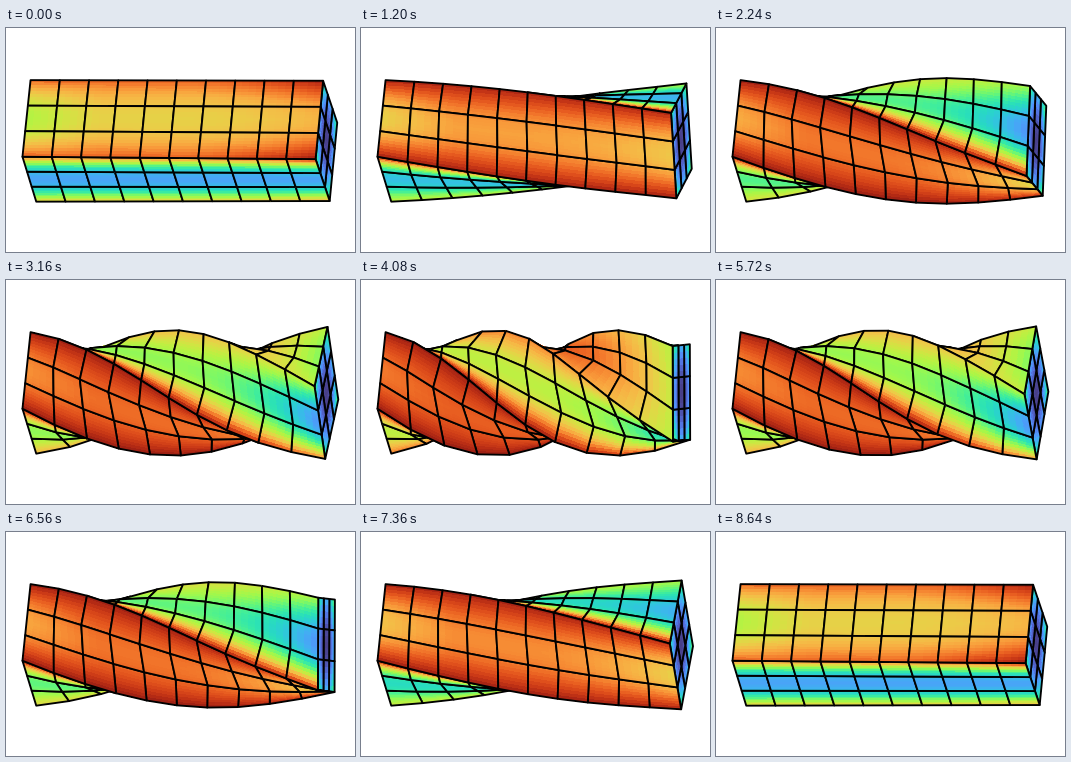
Write a matplotlib script that moves like this. It is 349 by 224 pixels and loops after 8.68 s.

```python
import numpy as np
import matplotlib.pyplot as plt
from matplotlib.animation import FuncAnimation
from matplotlib.collections import PolyCollection

W, H, DPI = 349, 224, 100
STEPS, HOLD, INTERVAL = 99, 10, 40
FRAMES = HOLD + STEPS + HOLD - 1 + STEPS

CELLS, ROWS = 10, 3          # cells along the beam and across a face
SUB_S, SUB_Z = 9, 4          # colour patches per cell
LEFT, MID_Y, LENGTH = 27.4, 112.9, 293.0
RADIUS, TILT = 62.8, 0.18
START, STEP = np.radians(14.6), np.radians(2.25)

# Colour levels over the load steps
KEYS = [0, 21, 32, 47, 73, 93]
LEVELS = dict(
    high_edge=[.80, .95, .96, .97, .97, .97],
    low_edge=[.62, .54, .55, .58, .67, .75],
    front=[.62, .71, .74, .77, .79, .81],
    side=[.21, .26, .32, .40, .48, .54],
    back=[.55, .65, .68, .70, .75, .83],
    left_drop=[.10, .09, .09, .08, .05, .04],
    front_drop=[-.06, .07, .12, .17, .20, .22],
    side_drop=[0, .03, .09, .22, .30, .28],
    high_drop=[-.17, 0, .02, .06, .28, .30],
    low_drop=[-.04, 0, .04, .08, .12, .22],
)
CMAP = plt.get_cmap("turbo")
HAZE = np.array([.75, .75, .75, 1])


def shade(values):
    """Colour map, slightly muted."""
    return .9 * CMAP(np.clip(values, 0, 1)) + .1 * HAZE


def refine(cells, sub):
    """Matrix of linear interpolation from cell nodes to finer nodes."""
    fine = np.linspace(0, cells, cells * sub + 1)
    return np.clip(1 - np.abs(fine[:, None] - np.arange(cells + 1)), 0, 1)


def project(q, z):
    """Section point (complex: up, towards viewer) and axial place to x, y, depth."""
    axial = z * LENGTH
    return np.stack([LEFT + axial - TILT * q.imag,
                     MID_Y - q.real,
                     q.imag + TILT * axial], axis=-1)


def quads(grid):
    return np.stack([grid[:-1, :-1], grid[1:, :-1],
                     grid[1:, 1:], grid[:-1, 1:]], axis=2)


def patch(nodes, values, sub):
    """Cells of one surface: colour quads, outlines and colours."""
    m, n = nodes.shape[0] - 1, nodes.shape[1] - 1
    a, b = sub
    fine = np.einsum("ij,jkc,lk->ilc", refine(m, a), nodes, refine(n, b))
    small = quads(fine).reshape(m, a, n, b, 4, 3)
    small = small.transpose(0, 2, 1, 3, 4, 5).reshape(m * n, a * b, 4, 3)
    outline = quads(nodes).reshape(m * n, 1, 4, 3)
    s = (np.arange(m * a) + .5) / (m * a)
    t = (np.arange(n * b) + .5) / (n * b)
    rgba = shade(values(s[:, None], t[None, :]))
    rgba = rgba.reshape(m, a, n, b, 4).transpose(0, 2, 1, 3, 4)
    return small, outline, rgba.reshape(m * n, a * b, 4)


def side_values(face, lv):
    mid = [lv["front"], lv["side"], lv["back"], lv["side"]][face]
    drop = lv["front_drop"] if face == 0 else lv["side_drop"]
    high = [True, True, False, False]

    def values(s, z):
        right = np.clip((z - .5) / .5, 0, 1) ** 2
        left = np.clip(1 - z / .25, 0, 1) * (face == 0)

        def edge(i):
            name = "high" if high[i % 4] else "low"
            return lv[name + "_edge"] - lv[name + "_drop"] * right

        centre = mid - drop * right - lv["left_drop"] * left
        rim = edge(face) * (1 - s) + edge(face + 1) * s
        return centre + (rim - centre) * (2 * s - 1) ** 2

    return values


def end_values(u, v):
    return .04 + .2 * ((2 * u - 1) ** 2 + (2 * v - 1) ** 2)


def beam(step):
    lv = {name: np.interp(step, KEYS, row) for name, row in LEVELS.items()}
    z = np.linspace(0, 1, CELLS + 1)
    total = STEP * (step + 1)
    # each increment moves the end along its tangent, so the end face grows
    growth = (1 + STEP ** 2) ** ((step + 1) / 2) - 1
    weight = np.clip((z - .87) / .13, 0, 1)
    radius = RADIUS * (1 + growth * weight)
    corners = [radius * np.exp(1j * (START + total * z + i * np.pi / 2))
               for i in range(5)]

    # axial warping of the sections, held back near both ends
    s = np.linspace(0, 1, ROWS + 1)[:, None]
    y = 2 * s - 1
    free = np.clip(np.minimum(z, 1 - z) * CELLS / 2.5, 0, 1)
    warp = 2.4 * total * y * (1 - y ** 2) * free
    dish = total * np.sin(2 * np.pi * z) * (2.2 * y ** 2 - 1.2)
    place = z + (warp + dish) / LENGTH

    parts = []
    for face in range(4):
        q = corners[face] * (1 - s) + corners[face + 1] * s
        parts.append(patch(project(q, place), side_values(face, lv),
                           (SUB_S, SUB_Z)))
    a, b, _, d = [c[-1] for c in corners[:4]]
    q = a + (b - a) * s + (d - a) * s.T
    parts.append(patch(project(q, np.ones(q.shape)), end_values, (5, 5)))
    return parts


def visible(polys):
    ds = polys[..., 1, :] - polys[..., 0, :] + polys[..., 2, :] - polys[..., 3, :]
    dt = polys[..., 3, :] - polys[..., 0, :] + polys[..., 2, :] - polys[..., 1, :]
    return ds[..., 0] * dt[..., 1] - ds[..., 1] * dt[..., 0] < 0


def scene(step):
    """Visible polygons from back to front, their colours and outline flags."""
    cells = []
    for small, outline, rgba in beam(step):
        depth = outline[:, 0, :, 2].mean(axis=1)
        seen = visible(small)
        for i in np.flatnonzero(seen.any(axis=1)):
            cells.append((depth[i], small[i][seen[i]], rgba[i][seen[i]],
                          outline[i]))
    cells.sort(key=lambda c: c[0])
    polys, colors, lines = [], [], []
    for _, small, rgba, outline in cells:
        polys += [small, outline]
        colors += [rgba, np.zeros((1, 4))]
        lines += [0] * len(small) + [1]
    return (np.concatenate(polys)[..., :2], np.concatenate(colors),
            np.array(lines))


def step_at(frame):
    up = np.clip(frame - HOLD + 1, 0, STEPS)
    down = max(0, frame - (2 * HOLD + STEPS - 2))
    return int(up - down)


fig = plt.figure(figsize=(W / DPI, H / DPI), dpi=DPI, facecolor="white")
ax = fig.add_axes([0, 0, 1, 1])
ax.set_xlim(0, W)
ax.set_ylim(H, 0)
ax.axis("off")
mesh = PolyCollection([], joinstyle="round")
ax.add_collection(mesh, autolim=False)


def draw(frame):
    polys, colors, lines = scene(step_at(frame))
    edges = np.zeros((len(lines), 4))
    edges[:, 3] = lines
    mesh.set_verts(polys)
    mesh.set_facecolor(colors)
    mesh.set_edgecolor(edges)
    mesh.set_linewidth(lines * 1.35)
    mesh.set_antialiased(lines.astype(bool))
    return [mesh]


anim = FuncAnimation(fig, draw, frames=FRAMES, init_func=lambda: draw(0),
                     interval=INTERVAL, repeat=True, blit=False)
plt.show()
```
